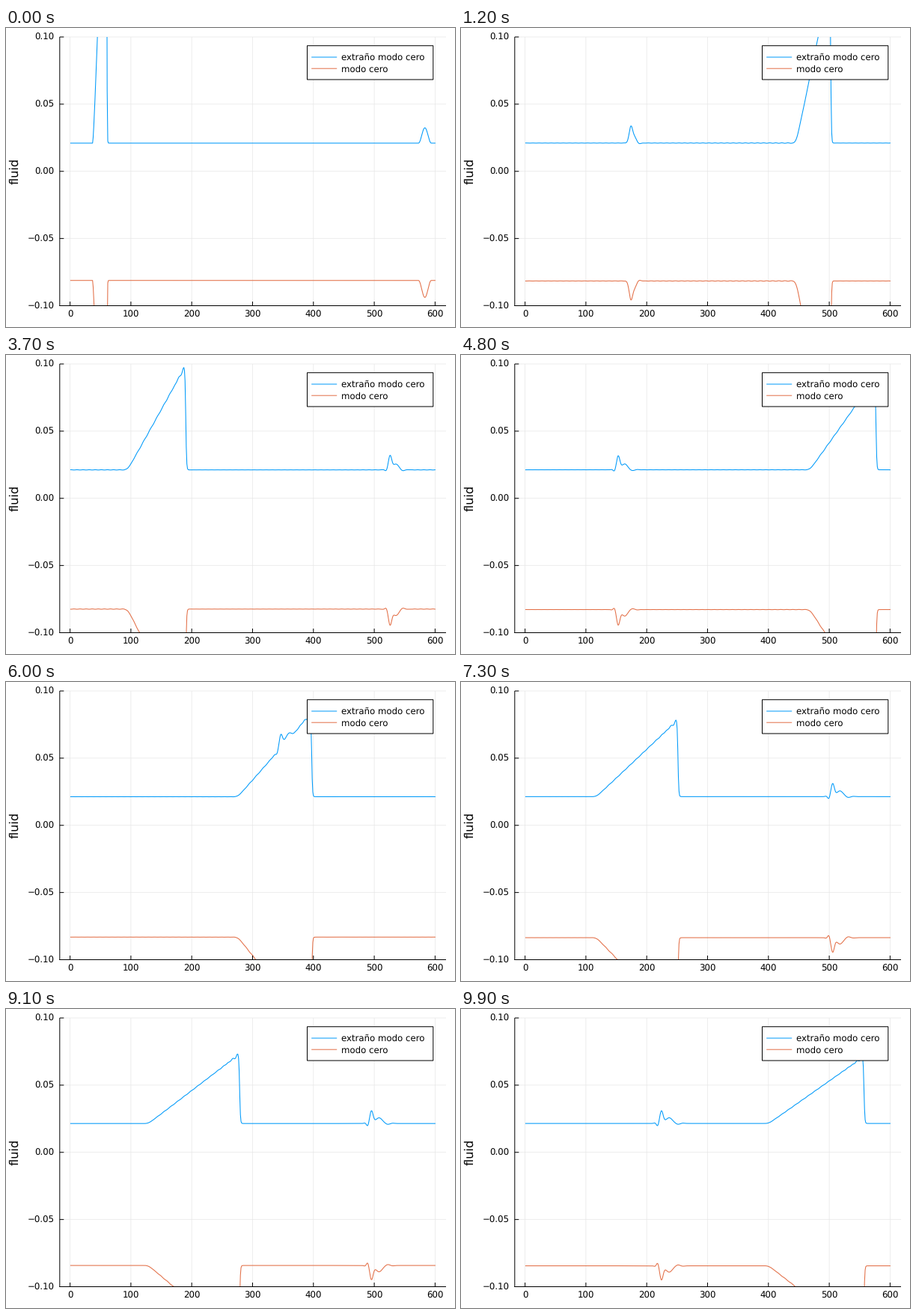
These frames come from a looping animation (600 px wide and 400 px high, 10000 ms). A matplotlib script:

```python
import numpy as np
import matplotlib.pyplot as plt
from matplotlib.animation import FuncAnimation
from matplotlib.lines import Line2D
from matplotlib.patches import Rectangle

W, H = 600, 400
PT = 0.72  # points per pixel at 100 dpi
FRAMES = 100
PERIOD = 600
BLUE, RED = "#009AFA", "#E36F47"
LEFT, RIGHT, TOP, BOTTOM = 71.8, 588, 12, 371.5
PAD = 0.03 * 599

plt.rcParams.update({"font.family": "DejaVu Sans", "text.hinting": "none",
                     "path.snap": False})
x = np.arange(1, 601)


def gauss(r, centre, width):
    return np.exp(-0.5 * ((r - centre) / width) ** 2)


def tall_wave(n):
    """Right-going pulse that steepens into a sawtooth."""
    tail = 37 + 33.97 * n
    length = np.sqrt(550 + 231 * n + 0.13 * n * n)
    s = (x - tail + 200) % PERIOD - 200

    # simple wave: each level travels in proportion to its height
    s0 = np.linspace(0, 10.5, 200)
    u0 = 0.37 * np.sin(np.pi * s0 / 21) ** 2
    path = s0 + (60 + 30.7 * n) * u0
    soft = 5 * (1 - np.exp(-n / 8))
    offsets = np.linspace(-soft, soft, 9)
    u = np.mean([np.interp(s + d, path, u0) for d in offsets], axis=0)

    # ripples behind the front
    d = length - s
    grown = 1 - np.exp(-n / 8)
    ripple = 0.0018 * np.exp(-np.abs(d) / 10) * np.cos(2 * np.pi * (d - 3.5) / 8)
    ripple += 0.0004 * np.exp(-n / 90) * np.cos(2 * np.pi * (d - 3.5) / 11)
    u += grown * ripple * np.clip(s / 20, 0, 1)

    front = 0.5 * (1 - np.tanh((s - length) / (0.6 + 0.7 * grown)))
    behind = (tail - x) % PERIOD
    trail = 0.00022 * (1 - np.exp(-n / 6)) * np.exp(-(n / 50) ** 2)
    return u * front + trail * np.exp(-behind / 350) * np.sin(2 * np.pi * behind / 10)


def small_wave(n):
    """Left-going bump that disperses into a crest and a shoulder."""
    young = np.exp(-n / 7)
    g = 1 - np.exp(-n / 35)
    peak = 583.2 - 33.9 * n - 2.9 * (1 - young)
    r = (x - peak + 300) % PERIOD - 300

    start = np.where(np.abs(r) < 10.5, 0.0114 * np.cos(np.pi * r / 21) ** 2, 0)
    c = 3.2 + 10 * g
    late = (0.0135 - 0.0045 * g) * gauss(r, 0, 2.7)
    late += (0.0048 - 0.0006 * g) * gauss(r, c, 2.4 + 3.2 * g)
    late -= 0.0026 * g * g * gauss(r, -6.2, 1.9)
    late += 0.0005 * g * g * gauss(r, -10.5, 2)
    late -= 0.0007 * gauss(r, c + 4 + 11 * g, 3.5)
    late += 0.0003 * g * gauss(r, c + 12 + 11 * g, 3)
    return young * start + (1 - young) * late


fig = plt.figure(figsize=(W / 100, H / 100), dpi=100, facecolor="white")


def to_fig(px, py):
    return px / W, 1 - py / H


def stroke(x0, y0, x1, y1, color="black", width=1, z=1):
    a, b = to_fig(x0, y0), to_fig(x1, y1)
    fig.add_artist(Line2D([a[0], b[0]], [a[1], b[1]], color=color, lw=width * PT,
                          zorder=z, solid_capstyle="butt"))


def label(px, py, text, size=11.7, **kw):
    fig.text(*to_fig(px, py), text, fontsize=size * PT, va="baseline", zorder=6, **kw)


# grid, ticks and tick labels
for v in np.linspace(-0.1, 0.1, 5):
    y = TOP + (0.1 - v) / 0.2 * (BOTTOM - TOP)
    stroke(LEFT, y, RIGHT, y, "#e6e6e6", 0.7, -2)
    stroke(LEFT, y, LEFT + 5.5, y)
    label(64.3, y + 4.3, f"{v:.2f}".replace("-", "\u2212"), ha="right")
for v in range(0, 601, 100):
    px = LEFT + (v - 1 + PAD) / (599 + 2 * PAD) * (RIGHT - LEFT)
    stroke(px, TOP, px, BOTTOM, "#e6e6e6", 0.7, -2)
    stroke(px, BOTTOM, px, BOTTOM - 5.5)
    label(px, 387.2, str(v), ha="center")
stroke(LEFT, TOP, LEFT, BOTTOM + 0.5)
stroke(LEFT - 0.5, BOTTOM, RIGHT, BOTTOM)
label(16.6, 191.3, "fluid", 16.1, rotation=90, ha="center", rotation_mode="anchor")

# legend
fig.add_artist(Rectangle(to_fig(402.5, 69), 168.3 / W, 45.3 / H, fc="white",
                         ec="black", lw=1 * PT, zorder=4,
                         transform=fig.transFigure))
for y, color, name in [(39, BLUE, "extraño modo cero"), (54.2, RED, "modo cero")]:
    stroke(408.2, y, 442.2, y, color, z=5)
    label(448, y + 4.3, name)

ax = fig.add_axes([LEFT / W, 1 - BOTTOM / H, (RIGHT - LEFT) / W, (BOTTOM - TOP) / H])
ax.set_xlim(1 - PAD, 600 + PAD)
ax.set_ylim(-0.1, 0.1)
ax.axis("off")
blue, = ax.plot([], [], color=BLUE, lw=1.05 * PT)
red, = ax.plot([], [], color=RED, lw=1.05 * PT)


def update(n):
    u = tall_wave(n) + small_wave(n)
    blue.set_data(x, 0.021 + 0.000005 * n + u)
    red.set_data(x, -0.0812 - 0.000033 * n - 1.11 * u)
    return blue, red


anim = FuncAnimation(fig, update, frames=FRAMES, interval=100, repeat=True,
                     repeat_delay=0, blit=False)
plt.show()
```
